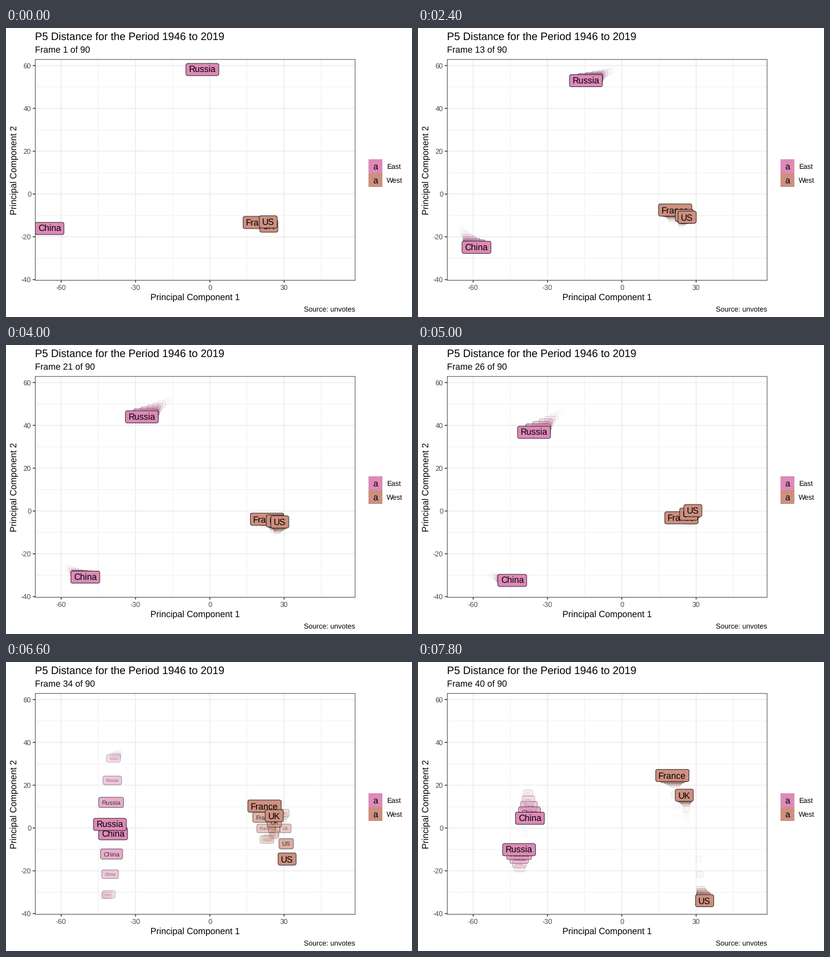
A matplotlib script that plays this animation: 672 by 480 pixels, repeating every 8 s.

```python
import matplotlib.pyplot as plt
from matplotlib.animation import FuncAnimation
from matplotlib.patches import FancyBboxPatch, Rectangle

plt.rcParams["font.family"] = "Liberation Sans"
plt.rcParams["text.hinting"] = "none"

W, H, DPI = 672, 480, 96
LEFT, RIGHT, TOP, BOTTOM = 48, 578, 52, 419
FRAMES, TOTAL, STEP_MS = 40, 90, 200
WAKE, STEP = 9, 5
PX = 72 / DPI
EAST, WEST = "#DD8AB8", "#CD9080"
INK, TICK, GRID = "#333333", "#4D4D4D", "#EBEBEB"
PAD, CORNER, CAP = 4.8, 2.9, 10.6

# Pixel points: start, middle and end of the slow drift, then three stops.
TRACKS = {
    "China": [(72, 333), (109, 374), (156, 391),
              (170, 386), (182, 218), (186, 270)],
    "France": [(420, 323), (428, 296), (436, 287),
               (432, 295), (425, 202), (420, 185)],
    "Russia": [(325, 69), (258, 98), (192, 145),
               (178, 160), (168, 343), (167, 304)],
    "UK": [(435, 329), (443, 304), (448, 281),
           (444, 287), (444, 234), (440, 218)],
    "US": [(434, 322), (449, 308), (455, 275),
           (461, 251), (468, 378), (476, 401)],
}
GROUP = {name: EAST if name in ("China", "Russia") else WEST
         for name in TRACKS}

fig = plt.figure(figsize=(W / DPI, H / DPI), dpi=DPI, facecolor="white")


def pixel_axes(x0, x1, y0, y1, z):
    ax = fig.add_axes([x0 / W, 1 - y1 / H, (x1 - x0) / W, (y1 - y0) / H],
                      zorder=z)
    ax.set_xlim(x0, x1)
    ax.set_ylim(y1, y0)
    ax.axis("off")
    return ax


panel = pixel_axes(LEFT, RIGHT, TOP, BOTTOM, 1)
page = pixel_axes(0, W, 0, H, 2)


def write(x, y, s, size, color="black", ha="left", **kw):
    return page.text(x, y, s, fontsize=size, color=color, ha=ha,
                     va="baseline", **kw)


def line(ax, xs, ys, width, color):
    ax.plot(xs, ys, color=color, lw=width * PX, zorder=1, snap=False,
            solid_capstyle="butt")


def to_x(v):
    return 337.4 + 4.1 * v


def to_y(v):
    return 275.7 - 3.555 * v


def vertical(v, width):
    line(panel, [to_x(v)] * 2, [TOP, BOTTOM], width, GRID)


def horizontal(v, width):
    line(panel, [LEFT, RIGHT], [to_y(v)] * 2, width, GRID)


def draw_grid():
    for v in range(-45, 50, 30):
        vertical(v, 0.71)
    for v in range(-30, 60, 20):
        horizontal(v, 0.71)
    for v in range(-60, 31, 30):
        vertical(v, 1.42)
        line(page, [to_x(v)] * 2, [BOTTOM, BOTTOM + 3.7], 1.42, INK)
        write(to_x(v), 434.8, str(v), 8.8, TICK, "center")
    for v in range(-40, 61, 20):
        horizontal(v, 1.42)
        line(page, [LEFT - 3.7, LEFT], [to_y(v)] * 2, 1.42, INK)
        write(41.6, to_y(v) + 4.2, str(v), 8.8, TICK, "right")
    page.add_patch(Rectangle((LEFT + 0.4, TOP + 0.2), RIGHT - LEFT - 0.5,
                             BOTTOM - TOP, fill=False, ec=INK,
                             lw=0.85 * PX, snap=False))


def draw_words():
    write(48, 20.3, "P5 Distance for the Period 1946 to 2019", 13.2)
    write(313, 452, "Principal Component 1", 11, ha="center")
    write(18, 236, "Principal Component 2", 11, ha="center", rotation=90,
          rotation_mode="anchor")
    write(578, 471, "Source: unvotes", 8.8, ha="right")
    for i, (name, fill) in enumerate([("East", EAST), ("West", WEST)]):
        y = 218 + 23 * i
        page.add_patch(Rectangle((600, y), 23, 23, fc=fill, ec="none"))
        write(611.5, y + 16.8, "a", 11, ha="center")
        write(630, y + 16, name, 8.8)


def text_width(s):
    probe = write(0, 0, s, 11)
    width = probe.get_window_extent(fig.canvas.get_renderer()).width
    probe.remove()
    return width


def mix(a, b, t):
    return tuple(p + (q - p) * t for p, q in zip(a, b))


def position(name, n):
    """Rest for one step, drift along a parabola, then move in lines."""
    start, mid, end, *stops = TRACKS[name]
    t = max(n / STEP - 1, 0) / 4
    if t <= 1:
        return tuple(a + (4 * m - 3 * a - b) * t + 2 * (a + b - 2 * m) * t * t
                     for a, m, b in zip(start, mid, end))
    leg, part = divmod(n - 5 * STEP, STEP)
    path = [end, *stops]
    return mix(path[leg], path[leg + 1], part / STEP)


draw_grid()
draw_words()
subtitle = write(48, 42, "", 11)
widths = {name: text_width(name) for name in TRACKS}
labels = []


def add_label(name, n, scale, z):
    x, y = position(name, n)
    w = widths[name] * scale + 2 * PAD
    h = CAP * scale + 2 * PAD
    box = FancyBboxPatch((x - w / 2, y - h / 2), w, h,
                         boxstyle=f"round,pad=0,rounding_size={CORNER}",
                         fc=GROUP[name], ec="black", lw=0.75 * PX,
                         alpha=scale, zorder=z, snap=False)
    labels.append(panel.add_patch(box))
    if scale > 0.08:
        labels.append(panel.text(x, y + CAP * scale / 2, name,
                                 fontsize=11 * scale, alpha=scale,
                                 ha="center", va="baseline", clip_on=True,
                                 zorder=z))


def update(n):
    for artist in labels:
        artist.remove()
    labels.clear()
    subtitle.set_text(f"Frame {n + 1} of {TOTAL}")
    z = 10
    for age in range(min(n, WAKE - 1), -1, -1):
        scale = (1 - age / WAKE) ** 3  # cubic falloff of size and opacity
        for name in TRACKS:
            add_label(name, n - age, scale, z)
            z += 1
    return labels


anim = FuncAnimation(fig, update, frames=FRAMES, interval=STEP_MS,
                     init_func=lambda: update(0), repeat=True,
                     repeat_delay=0, blit=False)
plt.show()
```
